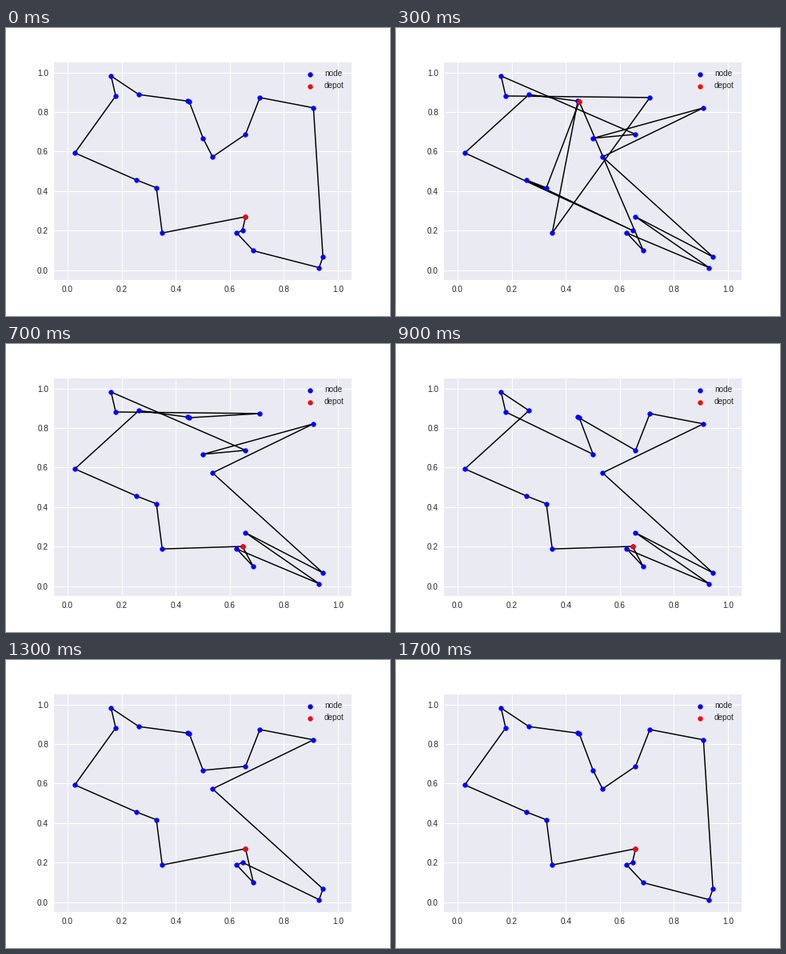
Animation, 480 px wide and 360 px high, one loop 8000 ms. Source, as a matplotlib script:

```python
import matplotlib.pyplot as plt
from matplotlib.animation import FuncAnimation

INK = "0.15"
plt.rcParams.update({
    "font.family": "Liberation Sans",
    "font.size": 10,
    "text.color": INK,
    "axes.facecolor": "#EAEAF2",
    "axes.edgecolor": "white",
    "axes.linewidth": 0,
    "axes.axisbelow": True,
    "grid.color": "white",
    "grid.linewidth": 1,
    "xtick.color": INK,
    "ytick.color": INK,
    "xtick.major.size": 0,
    "ytick.major.size": 0,
    "xtick.major.pad": 7,
    "ytick.major.pad": 7,
    "lines.solid_capstyle": "round",
    "legend.frameon": False,
})

NODES = {
    "A": (.027, .593), "B": (.161, .982), "C": (.178, .881), "D": (.264, .888),
    "E": (.4445, .855), "F": (.450, .852), "G": (.501, .667), "H": (.536, .573),
    "I": (.658, .687), "J": (.711, .873), "K": (.909, .821), "L": (.944, .067),
    "M": (.930, .0125), "N": (.687, .098), "O": (.6255, .188), "P": (.6465, .201),
    "Q": (.658, .270), "R": (.350, .188), "S": (.3285, .4165), "T": (.2555, .4555),
}
START = "FSTPADKRMCBIGEHLQJON"

# (tick, move, first node, second node); one tick is 100 ms
MOVES = [
    (2, "swap", "M", "J"), (3, "swap", "K", "E"),
    (4, "swap", "F", "R"), (5, "flip", "R", "P"),
    (7, "flip", "T", "R"), (8, "swap", "J", "G"), (9, "flip", "E", "B"),
    (10, "flip", "Q", "M"), (11, "flip", "G", "E"),
    (12, "flip", "D", "C"), (13, "swap", "P", "Q"),
    (15, "flip", "P", "N"), (16, "flip", "I", "H"), (17, "flip", "K", "I"),
]
TICKS = 80


def swap(tour, a, b):
    return tour.translate(str.maketrans(a + b, b + a))


def flip(tour, a, b):
    i, j = tour.index(a), tour.index(b) + 1
    return tour[:i] + tour[i:j][::-1] + tour[j:]


def tour_at(tick):
    """Improve the start tour up to this tick; tick 0 shows the best one."""
    tour = START
    for when, move, a, b in MOVES:
        if tick == 0 or when <= tick:
            tour = (swap if move == "swap" else flip)(tour, a, b)
    return tour


fig = plt.figure(figsize=(480 / 72, 5), dpi=72, facecolor="white")
ax = fig.add_axes([.125, .125, .775, .755])
ticks = [k / 5 for k in range(6)]
ax.set(xlim=(-.05, 1.05), ylim=(-.05, 1.05), xticks=ticks, yticks=ticks)
ax.grid(True)

path, = ax.plot([], [], color="black", lw=1.5, zorder=2)
dot = dict(s=36, linewidths=.3, zorder=3)
ax.scatter(*zip(*NODES.values()), c="blue", label="node", **dot)
depot = ax.scatter([0], [0], c="red", label="depot", **dot)
ax.legend(loc="upper right")


def draw(tick):
    tour = tour_at(tick)
    path.set_data(*zip(*(NODES[n] for n in tour + tour[0])))
    depot.set_offsets([NODES[tour[0]]])
    return path, depot


anim = FuncAnimation(fig, draw, frames=TICKS, interval=100,
                     repeat=True, repeat_delay=0)
plt.show()
```
